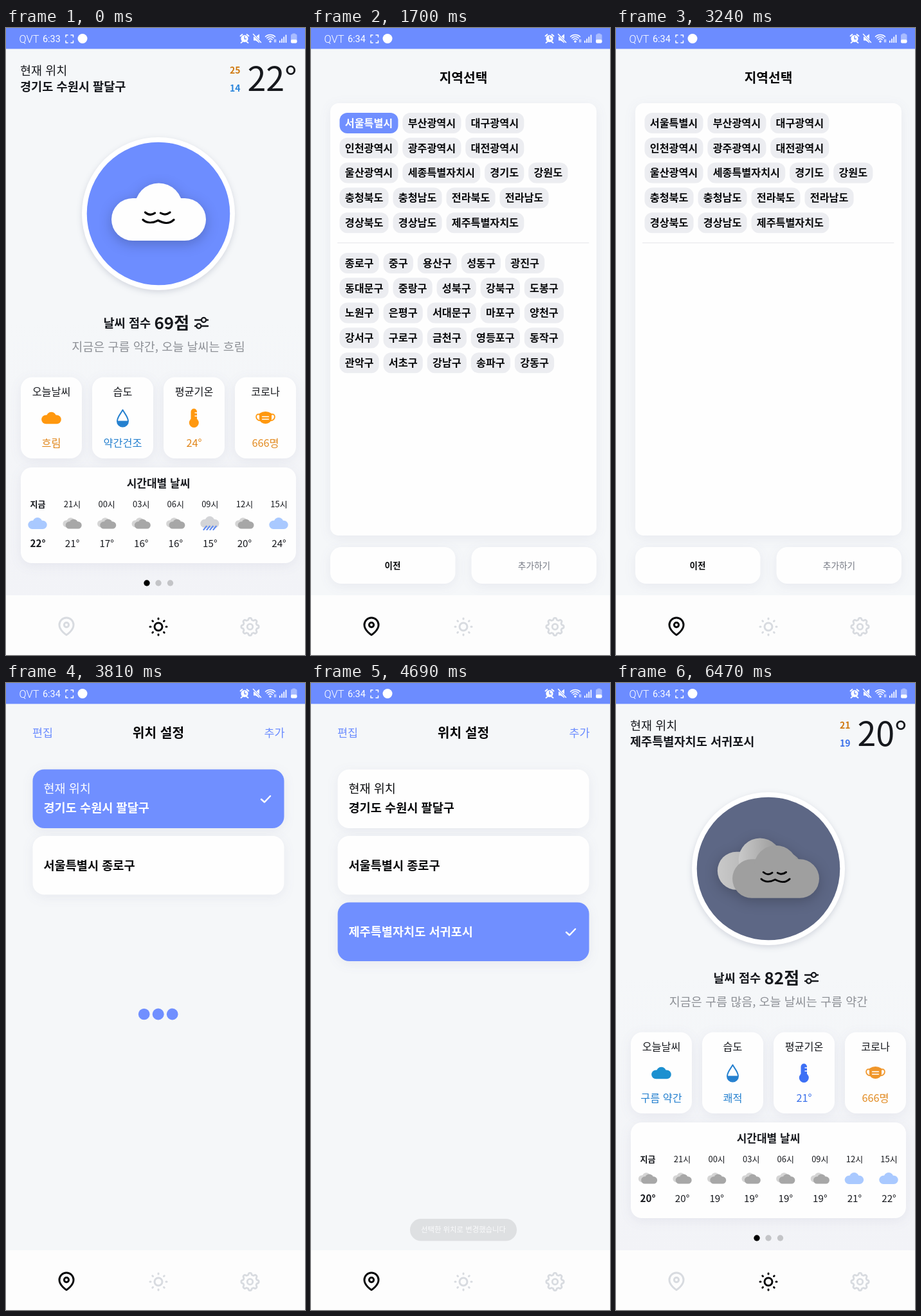
Recreate the animation shown at these times as an HTML page. Size 465 by 976 pixels, loop 6880 ms.

```html
<!DOCTYPE html>
<html lang="ko">
<head>
<meta charset="utf-8">
<title>날씨</title>
<style>
html, body { margin: 0; width: 100%; height: 100%; overflow: hidden; background: #f5f7f9; }
svg { display: block; width: 100%; height: 100%; font-family: 'Noto Sans CJK KR', 'Noto Sans CJK', 'Noto Sans CJK JP', sans-serif; }
.card { filter: drop-shadow(0 4px 9px rgba(50, 60, 110, .07)); }
.line { fill: none; stroke-linecap: round; stroke-linejoin: round; }
</style>
</head>
<body>
<svg id="stage" viewBox="0 0 465 976"></svg>
<script>
const LOOP = 6880, BLUE = '#708fff', INK = '#16181d', ORANGE = '#ff980f';
const stage = document.getElementById('stage');

const text = (x, y, size, str, { w = 400, fill = INK, at = 'start' } = {}) =>
  `<text x="${x}" y="${y}" font-size="${size}" font-weight="${w}" fill="${fill}" text-anchor="${at}">${str}</text>`;
const mid = (x, y, size, str, w, fill) => text(x, y, size, str, { w, fill, at: 'middle' });
const box = (x, y, w, h, r, fill, cls = '') =>
  `<rect class="${cls}" x="${x}" y="${y}" width="${w}" height="${h}" rx="${r}" fill="${fill}"/>`;
const card = (x, y, w, h, r, fill = '#fefefe') => box(x, y, w, h, r, fill, 'card');
const dot = (x, y, r, fill) => `<circle cx="${x}" cy="${y}" r="${r}" fill="${fill}"/>`;
const ring = (x, y, r, color, w) => `<circle class="line" cx="${x}" cy="${y}" r="${r}" stroke="${color}" stroke-width="${w}"/>`;
const line = (d, color, w) => `<path class="line" d="${d}" stroke="${color}" stroke-width="${w}"/>`;
const shape = (d, fill) => `<path d="${d}" fill="${fill}"/>`;
const place = (x, y, k, body) => `<g transform="translate(${x} ${y}) scale(${k})">${body}</g>`;

// ---- status bar and tabs
function statusBar(clock) {
  const w = '#fff';
  let s = box(0, 0, 465, 32.5, 0, '#6c8cff');
  s += `<g style="font-family:Roboto,sans-serif">${text(20.5, 23, 16.5, 'QVT', { w: 300, fill: w })}${text(57, 22, 14.4, clock, { fill: w })}</g>`;
  s += line('M93 14v-3h3M101 11h3.500v3M104.500 20v3h-3.500M96 23h-3v-3', w, 1.5);
  s += dot(119, 16.500, 7.5, w);
  s += dot(371, 16.500, 5.6, w) + line('M364.500 12.500l3-2.500M377.500 12.500l-3-2.500M367.500 21.500l-2 1.500M374.500 21.500l2 1.500', w, 1.8)
    + line('M371 13v4h2.500', '#6c8cff', 1.3);
  s += shape('M385 13.500h3.500l5.500-4v14l-5.500-4h-3.500z', w) + line('M384.500 9.500l12 13', '#6c8cff', 3) + line('M384.500 9.500l12 13', w, 1.5);
  for (const r of [4, 7, 10]) s += line(`M${411 - r * .75} ${21 - r * .75}a${r * 1.06} ${r * 1.06} 0 0 1 ${r * 1.5} 0`, w, 1.5);
  s += dot(411, 21, 1.8, w) + line('M417.500 18v4M419.500 22v-4', w, 1);
  for (let i = 0; i < 4; i++) s += box(425 + 3.2 * i, 19.5 - 3 * i, 1.7, 3.5 + 3 * i, .5, w);
  return s + box(443, 9.5, 9.5, 14, 2, '#a9bcff') + box(445.5, 8.5, 4.5, 2, .5, '#a9bcff') + box(443, 18, 9.5, 5.5, 2, w);
}

function tabs(active) {
  const color = i => i === active ? '#08090b' : '#d8dbe0';
  let s = box(0, 883, 465, 93, 0, '#fdfdfd');
  s += place(94, 931.5, 1.2, line('M9.200-2C9.200 5.500 0 11 0 11S-9.200 5.500-9.200-2a9.200 9.200 0 0 1 18.400 0z', color(0), 2.5) + ring(0, -2, 3, color(0), 2.5));
  let rays = '', gear = '';
  for (let i = 0; i < 8; i++) {
    const c = Math.cos(i * Math.PI / 4), n = Math.sin(i * Math.PI / 4);
    rays += `M${c * 12} ${n * 12}L${c * 13} ${n * 13}`;
  }
  for (let i = 0; i < 96; i++) {
    const a = i * Math.PI / 48, r = 12.2 + 1.5 * Math.tanh(2 * Math.cos(8 * a));
    gear += `${i ? 'L' : 'M'}${(r * Math.cos(a)).toFixed(2)} ${(r * Math.sin(a)).toFixed(2)}`;
  }
  s += place(237, 932, 1, ring(0, 0, 6, color(1), 3) + line(rays, color(1), 3));
  return s + place(379.5, 932, 1, line(gear + 'z', color(2), 2.8) + ring(0, 0, 4.3, color(2), 2.8));
}

// ---- weather pictures
const cloud = (x, y, k, fill) => place(x, y, k, box(-73.5, -21.5, 147, 66, 33, fill) + dot(0, -8, 37, fill));
const clouds = (x, y, k, back, front) =>
  cloud(x - 13 * k, y - 6.5 * k, .9 * k, back) + cloud(x + 11.5 * k, y + 5.5 * k, .918 * k, front);
const face = (x, y, k) => place(x, y, k, line('M-20.500 0q7.500 6.500 15 1M3.500 1q7.500 4.500 14.500-1M-24 11.500C-18 17-9 17-.500 12.500 8 17 16 19 24 11.500', '#050507', 3.2));

const HOUR_ICON = {
  c: x => cloud(x, 771, .2, '#a9c9ff'),
  g: x => clouds(x + .5, 771, .185, '#d5d5d5', '#a7a7a7'),
  r: x => cloud(x, 769, .198, '#d3d4d7') +
    line([0, 1, 2, 3].map(i => `M${x - 5 + i * 5} 775.500l-4.500 5.500`).join(''), '#5f8af0', 2)
};

const SUWON = {
  name: '경기도 수원시 팔달구', hi: 25, lo: 14, loColor: '#2b86dc', now: 22, sky: '#6d8dff', score: 69,
  note: '지금은 구름 약간, 오늘 날씨는 흐림',
  today: ['흐림', ORANGE, '#e0861a'], wet: ['약간건조', '#2580cf'], avg: ['24°', ORANGE, '#e0861a'],
  icons: 'cggggrgc', temps: [22, 21, 17, 16, 16, 15, 20, 24]
};
const JEJU = {
  name: '제주특별자치도 서귀포시', hi: 21, lo: 19, loColor: '#3a70ea', now: 20, sky: '#5d6785', score: 82,
  note: '지금은 구름 많음, 오늘 날씨는 구름 약간',
  today: ['구름 약간', '#1c90d0', '#2580cf'], wet: ['쾌적', '#2580cf'], avg: ['21°', '#3d70f5', '#3a70ea'],
  icons: 'ggggggcc', temps: [20, 20, 19, 19, 19, 19, 21, 22]
};
const HOURS = ['지금', '21시', '00시', '03시', '06시', '09시', '12시', '15시'];

const drop = color => line('M181.500 594.500C178 601 173 605.500 173 612a8.500 8.500 0 0 0 17 0c0-6.500-5-11-8.500-17.500z', color, 2)
  + shape('M173 611.500h17a8.500 8.500 0 0 1-17 0z', color);
const thermometer = color => box(287.5, 592.5, 9.5, 24, 4.7, color) + dot(292.3, 614.5, 7.5, color)
  + line('M294 599h3M294 604h3', '#fff', 1.3);
const mask = color => line('M395 602c-8-4-8 10 1 9M412 602c8-4 8 10-1 9', color, 1.8)
  + shape('M394 600q9.500-6 19 0v9q-2 7-9.500 7t-9.500-7z', color) + line('M398.500 605h10M398.500 609h10', '#fff', 1.3);

function home(d) {
  let s = `<defs><linearGradient id="bg" x2="0" y2="1"><stop offset=".5" stop-color="#f5f7f9"/><stop offset="1" stop-color="#f2f3f7"/></linearGradient>
    <linearGradient id="dim"><stop stop-color="#c9c9c9"/><stop offset="1" stop-color="#979797"/></linearGradient></defs>`;
  s += box(0, 32, 465, 852, 0, 'url(#bg)');
  s += text(22, 73, 18.5, '현재 위치') + text(22, 98, 18.6, d.name, { w: 700 });
  s += mid(356.3, 71, 14, d.hi, 700, '#d0790e') + mid(356.3, 98.5, 14, d.lo, 700, d.loColor);
  s += text(375.5, 98, 52, d.now + '°');
  s += `<g style="filter:drop-shadow(0 3px 5px rgba(40,50,90,.16))">${dot(237, 289, 119, '#fff')}</g>` + dot(237, 289, 111.3, d.sky);
  s += '<g style="filter:drop-shadow(0 5px 10px rgba(0,0,0,.22))">';
  s += d === SUWON
    ? cloud(237.5, 286.5, 1, '#fefefe') + '</g>' + face(237, 287, 1)
    : clouds(237, 288.5, 1, 'url(#dim)', '#9f9f9f') + '</g>' + face(248, 294.5, .918);
  s += text(151.5, 466, 18.6, '날씨 점수', { w: 700 }) + text(230.5, 469, 26, d.score + '점', { w: 700 });
  s += line('M294 454.500h9.500M312 454.500h2M294 464h2M304 464h10', INK, 2.4) + ring(307.5, 454.5, 3.6, INK, 2.3) + ring(299.8, 464, 3.6, INK, 2.3);
  s += mid(237, 502.5, 18.5, d.note, 400, '#8d9096');
  const orange = d === SUWON ? ORANGE : '#f0962a';
  const cells = [
    ['오늘날씨', d.today[0], d.today[2], cloud(70.5, 607, .208, d.today[1])],
    ['습도', d.wet[0], d.wet[1], drop(d.wet[1])],
    ['평균기온', d.avg[0], d.avg[2], thermometer(d.avg[1])],
    ['코로나', '666명', '#e28b22', mask(orange)]
  ];
  cells.forEach(([title, value, color, icon], i) => {
    const x = 70.5 + 111 * i;
    s += card(x - 47.5, 543.5, 95, 126.5, 18) + mid(x, 572, 16.2, title, 500) + icon + mid(x, 652, 16.3, value, 500, color);
  });
  s += card(23, 684, 428, 149, 17) + mid(237, 715, 17, '시간대별 날씨', 700);
  HOURS.forEach((hour, i) => {
    const x = 49 + 53.57 * i, w = i ? 500 : 700;
    s += mid(x + .5, 746, 13, hour, w) + HOUR_ICON[d.icons[i]](x) + mid(x + .5, 808, 15.2, d.temps[i] + '°', w);
  });
  [219, 237, 255.5].forEach((x, i) => s += dot(x, 864, 4.7, i ? '#c3c4c7' : '#000'));
  return s + tabs(1);
}

// ---- saved places
const PLACES = [SUWON.name, '서울특별시 종로구', JEJU.name];

function places(count, selected, t, loading, toast) {
  let s = text(41, 84, 17.4, '편집', { w: 500, fill: '#6b8cff' }) + mid(237, 84.5, 20.3, '위치 설정', 700, '#050507')
    + text(433.5, 84, 17.4, '추가', { w: 500, fill: '#6b8cff', at: 'end' });
  for (let i = 0; i < count; i++) {
    const y = 134.5 + 103.5 * i, on = i === selected, fill = on ? '#fff' : '#08090b';
    s += card(41.5, y, 391, 91.5, 18, on ? BLUE : '#fefefe');
    if (!i) s += text(58.5, y + 36, 18.5, '현재 위치', { fill });
    s += text(58.5, y + (i ? 52.5 : 66.5), 18.6, PLACES[i], { w: 700, fill });
    if (on) s += line(`M397 ${y + 46.5}l5 4.500 9-9.500`, '#fff', 2.5);
  }
  if (loading) for (let i = 0; i < 3; i++)
    s += dot(214.7 + 22 * i, 515.5, 7.3 + 1.7 * Math.cos((t - 3810) / 70 - (i - 1) * .4), BLUE);
  if (toast > 0) s += `<g opacity="${toast}">${box(154, 834, 166, 34.500, 17, '#c9cacd')}${mid(237, 855, 11.4, '선택한 위치로 변경했습니다', 400, '#fff')}</g>`;
  return s + tabs(0);
}

// ---- region picker
const PROVINCES = '서울특별시 부산광역시 대구광역시 인천광역시 광주광역시 대전광역시 울산광역시 세종특별자치시 경기도 강원도 충청북도 충청남도 전라북도 전라남도 경상북도 경상남도 제주특별자치도'.split(' ');
const DISTRICTS = {
  서울특별시: '종로구 중구 용산구 성동구 광진구 동대문구 중랑구 성북구 강북구 도봉구 노원구 은평구 서대문구 마포구 양천구 강서구 구로구 금천구 영등포구 동작구 관악구 서초구 강남구 송파구 강동구'.split(' '),
  제주특별자치도: ['제주시', '서귀포시']
};

function chips(names, y, picked) {
  let x = 44.5, s = '';
  for (const name of names) {
    const w = name.length * 14.9 + 16.5;
    if (x + w > 415) { x = 44.5; y += 38.8; }
    const on = name === picked;
    s += box(x, y, w, 32, 12, on ? BLUE : '#ecedf1') + mid(x + w / 2, y + 21.7, 16.2, name, 700, on ? '#fff' : '#08090b');
    x += w + 6.9;
  }
  return s;
}

function picker({ loaded, province, listed, district }) {
  const rule = loaded ? 334.5 : 140.5;
  let s = mid(237, 84.5, 20.3, '지역선택', 700, '#050507') + card(30, 117, 414, 673, 13);
  if (loaded) s += chips(PROVINCES, 132, province);
  s += line(`M41.500 ${rule}H432`, '#e5e6ea', 1);
  if (listed) s += chips(DISTRICTS[province], 350, district);
  s += card(30, 808, 194.5, 57, 17) + card(249.5, 808, 194.5, 57, 17);
  s += mid(127, 841.5, 13.5, '이전', 700, '#08090b')
    + mid(347, 841.5, 13.7, '추가하기', district ? 700 : 500, district ? '#08090b' : '#757984');
  return s + tabs(0);
}

const clamp = v => Math.max(0, Math.min(1, v));

function screen(t) {
  if (t < 70) return home(SUWON);
  if (t < 810) return places(1, 0, t, t < 740);
  if (t < 2570) return picker({
    loaded: t >= 1090, province: t >= 1420 && '서울특별시', listed: t >= 1700, district: t >= 2100 && '종로구'
  });
  if (t < 3040) return places(t < 2770 ? 1 : 2, 0, t, t < 2770);
  if (t < 3740) return picker({
    loaded: t >= 3170, province: t >= 3310 && '제주특별자치도', listed: t >= 3450, district: t >= 3590 && '서귀포시'
  });
  if (t < 6000) {
    const toast = Math.min(clamp((t - 4620) / 140), clamp((5040 - t) / 140));
    return places(t < 3950 ? 2 : 3, t < 4420 ? 0 : 2, t, t < 3950 || (t >= 4420 && t < 4620), toast);
  }
  return home(t < 6470 ? SUWON : JEJU);
}

let shown = '';
function frame() {
  const t = performance.now() % LOOP;
  const next = box(0, 0, 465, 976, 0, '#f5f7f9') + screen(t) + statusBar(t < 70 ? '6:33' : '6:34');
  if (next !== shown) stage.innerHTML = shown = next;
  requestAnimationFrame(frame);
}
frame();
</script>
</body>
</html>
```
